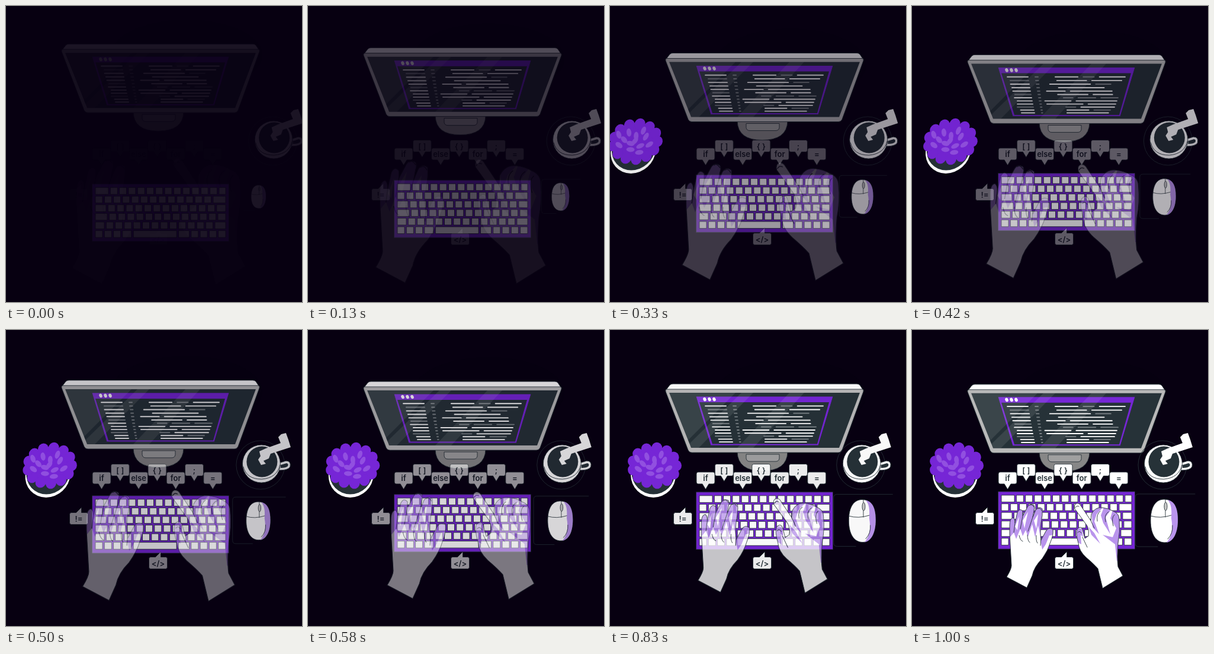
An HTML page for the animation above (1.04 s loop, 500 by 500 pixels).

```html
<!DOCTYPE html>
<html>
<head>
<meta charset="utf-8">
<style>
  html, body { margin: 0; width: 100%; height: 100%; overflow: hidden; background: #070011; }
  svg { display: block; width: 100vw; height: 100vh; }
  text { font: 600 13px Inter, "Open Sans", sans-serif; text-anchor: middle; fill: #263238; }
  .o { stroke: #263238; stroke-width: .9; stroke-linejoin: round; }
  .line { fill: none; stroke: #263238; stroke-width: .9; stroke-linecap: round; }
  .w { fill: #fff; }
  .p { fill: #7626d6; }
  .l { fill: #b994ec; }
  .d { fill: #263238; }
</style>
</head>
<body>
<svg viewBox="0 0 500 500">
  <defs>
    <path id="left" d="M160 417Q168 404 168 398L165 345V330Q165 318 171 317Q174 319 174 326L178 308Q182 300 187 306V314L195 299Q199 292 206 296Q208 300 206 305L204 316L209 304Q214 297 220 302Q221 312 218 326Q216 345 218 355L226 340Q231 332 238 337Q239 346 234 358Q230 372 220 386Q206 400 203 415L194 435Z"/>
    <path id="right" d="M322 436L314 403Q307 395 294 384Q282 373 281 360Q276 343 279 336Q285 330 288 337L292 352L298 348Q300 340 296 331L275 302Q273 295 278 293Q283 292 286 298L302 322L303 311Q309 299 321 300Q332 301 340 306Q350 310 350 320Q352 340 348 360Q346 385 348 400L356 415Z"/>
    <clipPath id="inLeft"><use href="#left"/></clipPath>
    <clipPath id="inRight"><use href="#right"/></clipPath>
  </defs>

  <g id="monitor">
    <ellipse cx="305" cy="110" rx="128" ry="60" fill="#060010"/>
    <path class="o" fill="#878787" d="M215 206Q216 238 257 238Q299 238 300 206Z"/>
    <path class="o" fill="#a0a0a0" d="M230 210H286V217Q285 222 280 222H236Q231 222 230 217Z"/>
    <path class="w o" d="M94 102L101 93Q103 91 106 91H417Q420 91 422 93L428 102Z"/>
    <path class="o" fill="#b9b9b9" d="M96 100H426Q429 100 428 104L392 203Q390 207 386 207H138Q134 207 132 203L94 104Q93 100 96 100Z"/>
    <path class="d" d="M100 106H422L387 199H137Z"/>
    <path class="p o" d="M145 112H377L352 195H170Z"/>
    <path class="d" d="M151 122H370L350 192.500H173Z"/>
    <g id="dots" class="w"></g>
    <g id="code" stroke-width="1.9" stroke-linecap="round"></g>
    <path fill="#fff" opacity=".09" d="M100 106H212L131 187ZM222 106H242L150 199H137L133 193ZM303 106H328L242 199H215Z"/>
  </g>

  <g id="keyboard">
    <path class="p o" d="M145.500 273H376.500V370H145.500Z"/>
    <g id="keys" class="w o"></g>
  </g>

  <g id="mouse">
    <path class="line" d="M478 277H383Q377 277 377 283V360Q377 366 383 366H415"/>
    <path class="w o" d="M426 286C440 286 449 298 449 320C449 345 440 359 427 359C412 359 403 345 403 322C403 298 412 286 426 286Z"/>
    <path class="l" d="M432 287C446 290 449 305 449 321C449 344 441 357 430 359C439 349 441 335 438 318C439 303 438 294 432 287Z"/>
    <path class="line" d="M403 314Q419 319 438 313M428 286V291M428 305V316M440 330Q441 344 432 353"/>
    <ellipse class="o" fill="#c9c9c9" cx="428.500" cy="298" rx="2.500" ry="7"/>
  </g>

  <g id="coffee">
    <circle class="line" cx="423" cy="228" r="41"/>
    <path class="w o" d="M453 225L466 221Q475 221 473 231Q470 237 454 237Z"/>
    <path class="d" d="M457 228L467 225Q471 226 469 230Q466 233 457 233Z"/>
    <circle class="w o" cx="424.500" cy="226" r="32"/>
    <path class="line" d="M394 231Q399 252 425 252Q451 250 456 228"/>
    <circle class="d" cx="425.500" cy="222.500" r="26"/>
    <path class="w" d="M453 181L458 176L466 174L470 185L474 198L440 209L437 217L428 221L432 226L424 228L419 219L423 213L421 205L432 200L457 191Z"/>
  </g>

  <g id="plant">
    <circle class="w" cx="73" cy="245" r="38"/>
    <circle class="d" cx="73" cy="241" r="36.500"/>
    <g id="crown" class="p"></g>
    <g id="leaves" fill="#9150e0"></g>
  </g>

  <g id="hands">
    <use href="#left" class="w"/>
    <g clip-path="url(#inLeft)">
      <path class="l" d="M160 290H224V318L217 349L213 330L208 350L203 328L196 349L192 338L187 348L183 336L176 353L172 342L164 352ZM223 330H240V346L232 347L226 362L220 371L217 355Z"/>
      <path class="w" d="M187 322L196 307L190 335ZM206 322L213 311L210 336ZM174 332L181 315L178 338Z"/>
    </g>
    <path class="line" d="M174 326L172 342M187 314L183 336M204 316L196 340M218 350L217 364M181 347Q183 356 187 357M195 346Q195 356 199 359M210 347Q209 356 212 360M199 296Q202 293 206 299M212 302Q216 299 219 305"/>
    <use href="#left" class="line"/>
    <use href="#right" class="w"/>
    <g clip-path="url(#inRight)">
      <path class="l" d="M303 298H324L312 311L308 323L316 345L305 333ZM324 300L336 304L327 316L335 345L323 326L319 313ZM339 304L356 308V395L346 390L343 362L322 346L339 350L345 335L335 318ZM277 333L287 336L289 350L285 346L286 362L279 358ZM298 332L308 343L318 361L303 346Z"/>
    </g>
    <path class="line" d="M302 322L308 335M313 323Q311 311 318 306M327 324Q324 312 332 307M340 331Q336 317 342 312M288 350L296 367M276 300Q278 296 282 298M280 342Q283 338 286 343"/>
    <use href="#right" class="line"/>
  </g>

  <g id="bubbles"></g>
</svg>
<script>
const $ = id => document.getElementById(id);
const fill = (id, count, part) => $(id).innerHTML = Array.from({ length: count }, (_, i) => part(i)).join('');
const ellipse = (x, y, rx, ry, turn) =>
  `<ellipse cx="${x}" cy="${y}" rx="${rx}" ry="${ry}" transform="rotate(${turn} ${x} ${y})"/>`;

let seed = 11;
const random = () => (seed = seed * 16807 % 2147483647) / 2147483647;

// Code: an indented name, a grey gutter mark and a few random spans per row
const span = (x, end, y, grey) =>
  `<path stroke="${grey ? '#7d8488' : '#fff'}" d="M${x} ${y}H${end}"/>`;
fill('dots', 3, i => ellipse(160 + 8 * i, 117, 2.6, 3.4, -25));
fill('code', 12, i => {
  const y = 128.3 + 6.3 * i - .07 * i * i;
  let row = span(161 + 1.6 * i + 8 * random(), 196 + i, y, i % 4 == 1)
    + span(208 + i, 213 + .7 * i, y, true);
  for (let x = 224 + 40 * random(); x < 325;) {
    const end = Math.min(x + 15 + 75 * random(), 360 - 2 * i);
    row += span(x, end, y, end - x < 30);
    x = end + 9;
  }
  return row;
});

// Keys: each row opens with its own widths, then square keys fill it to the edge
const openings = [[22], [12], [18], [20], [15], [12, 12, 12, 15, 73, 18]];
fill('keys', openings.length, row => {
  const edge = 371, size = 12, gap = 3.3, y = 279 + 14.55 * row;
  let keys = '';
  for (let x = 151, n = 0; edge - x > size - 1; n++) {
    let end = x + (openings[row][n] || size);
    if (edge - end < size + gap - 1) end = edge;
    keys += `<path d="M${x} ${y}H${end}v${size - .4}H${x}Z"/>`;
    x = end + gap;
  }
  return keys;
});

fill('crown', 14, i => {
  const a = i * Math.PI / 6.5;
  return i ? ellipse(75 + 37 * Math.cos(a), 229 + 30 * Math.sin(a), 9, 9.5, 0) : ellipse(75, 229, 36, 32, 0);
});
fill('leaves', 13, i => {
  const a = 2.4 * i, r = Math.sqrt(i / 13);
  return ellipse(74 + 34 * r * Math.cos(a), 228 + 22 * r * Math.sin(a), 7, 4, 70 * i - 55);
});

const down = 'M0 3Q0 0 3 0H28Q31 0 31 3V17Q31 20 28 20H21L15.500 29L10 20H3Q0 20 0 17Z';
const up = 'M0 3Q0 0 3 0H11L20 -9V0H28Q31 0 31 3V17Q31 20 28 20H3Q0 20 0 17Z';
const bubble = (label, x, y, shape = down) =>
  `<g transform="translate(${x} ${y})"><path class="w o" d="${shape}"/><text x="15.5" y="15">${label}</text></g>`;
const labels = ['if', '[ ]', 'else', '{ }', 'for', ';', '='];
fill('bubbles', labels.length, i => bubble(labels[i], 146 + 31.3 * i, i % 2 ? 226.5 : 240));
$('bubbles').innerHTML += bubble('!=', 107.5, 308.5, up) + bubble('&lt;/&gt;', 241.5, 383.5, up);

function pose(id, transform, opacity) {
  $(id).setAttribute('transform', transform);
  $(id).setAttribute('opacity', opacity);
}
const zoom = (x, y, s) => `translate(${x} ${y}) scale(${s}) translate(${-x} ${-y})`;

const start = performance.now();
function draw() {
  const t = (performance.now() - start) % 1040;
  const step = Math.min(24, Math.floor((t + 5) * .024)); // moves at 24 steps a second
  const p = (step + 1) / 25;
  const out = 1 - (1 - p) ** 2;
  const shift = 30 * (1 - out);
  pose('monitor', `translate(0 ${.8 - shift})`, out);
  pose('keyboard', `translate(0 ${shift})`, out);
  pose('coffee', `translate(${shift} 0)`, out);
  pose('mouse', zoom(427, 322, .5 + out / 2), out);

  // The plant rushes in, then sways upright
  const rest = Math.max(0, 1 - p / .6) ** 2.7;
  const lean = 20 * (1 - out) * Math.cos(6.6 * p);
  pose('plant', `translate(${-389 * rest} 236) skewX(${lean}) translate(0 -236)`, 1 - rest);

  const near = p ** 1.5;
  pose('hands', zoom(258, 365, 1.5 - near / 2), near);
  pose('bubbles', '', Math.min(1, 1.2 * near));
  requestAnimationFrame(draw);
}
draw();
</script>
</body>
</html>
```
